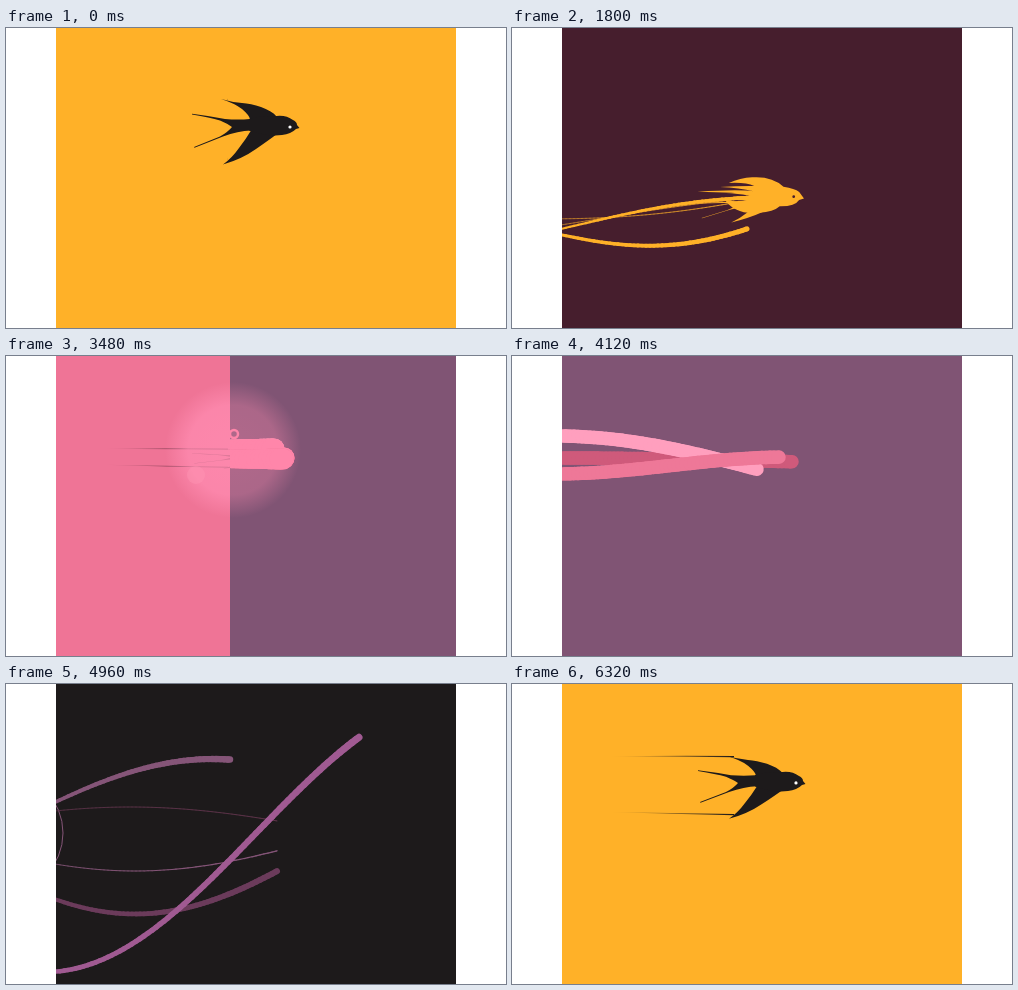
Recreate the animation shown at these times as an HTML page with a canvas. Size 500x300 px, loop 6360 ms.

```html
<!DOCTYPE html>
<html lang="en">
<head>
<meta charset="utf-8">
<title>Flying bird</title>
<style>
html, body { margin: 0; width: 100%; height: 100%; overflow: hidden; background: #fff; }
canvas { display: block; width: 500px; height: 300px; }
</style>
</head>
<body>
<canvas id="stage" width="500" height="300"></canvas>
<script>
const ctx = document.getElementById('stage').getContext('2d');
const LOOP = 6360, SPEED = 0.7714, LEFT = 50, RIGHT = 450;
const ORANGE = '#ffb128', PLUM = '#461e2d', PINK = '#ef7496', PURPLE = '#805474', INK = '#1d1a1b';

const clamp = (x, a = 0, b = 1) => Math.min(b, Math.max(a, x));
const mix = (a, b, u) => a + (b - a) * u;
const smooth = u => (1 - Math.cos(Math.PI * clamp(u))) / 2;
const easeOut = u => 1 - (1 - clamp(u)) ** 3;

function track(keys) {
  return t => {
    if (t <= keys[0][0]) return keys[0][1];
    for (let i = 1; i < keys.length; i++) {
      const [t0, a] = keys[i - 1], [t1, b] = keys[i];
      if (t <= t1) return mix(a, b, smooth((t - t0) / (t1 - t0)));
    }
    return keys[keys.length - 1][1];
  };
}

// Height of the flight line and opening of the wings
const flight = track([[0, 98], [500, 98], [1000, 196], [1400, 205], [2400, 112], [2800, 90],
  [3380, 101], [3480, 101], [4120, 105], [5600, 112], [6100, 97.5], [6360, 98]]);
const spread = track([[0, 1], [280, .35], [560, 1], [1000, 0], [1300, .8], [1650, .1], [1950, .8],
  [2400, 0], [2720, .9], [2980, .2], [3230, .9], [3480, 0], [5650, .2], [5900, 1], [6110, .4],
  [6320, .94], [6360, 1]]);
const pitch = t => Math.atan((flight(t + 20) - flight(t - 20)) / 40 / SPEED) * 0.6;

const WINGS = new Path2D('M271 89 C264 80 247 76 236 75 Q225 74 215 71 Q228 75 236 81 Q243 87 244 91 ' +
  'Q232 92 219 91 Q204 88 186 85.7 L186 86.5 Q204 89.5 214 92.5 Q222 96 226 99 Q222 104 214 108.5 ' +
  'L188 119 L188.5 119.8 L217 108.5 Q232 103 245 102.5 Q240 111 233 120 Q226 130 217 136.5 ' +
  'Q236 131 250 121 Q263 112 271 106 Z');
const BODY = new Path2D('M243 91 Q256 87 267 88.5 Q279 86 287 92 Q291 94 291 97 L293.5 100 L290 101 ' +
  'Q285 106 276 107 Q262 109 243 102.5 Z');
const FLAME = new Path2D('M292 198 L288 191 Q284 187 273 184 Q263 172 243 171 Q231 170 219 174 ' +
  'Q236 175 244 180 Q228 178 210 177 Q229 180 243 185 Q228 181 187 179 Q227 184 241 189 ' +
  'Q224 188 206 188.5 Q225 190 236 194 Q226 195 213 190 Q222 207 246 207 Q260 208 267 203 Q282 205 287 199 Z');
const PLUME = new Path2D('M290.5 112.5 L286.5 108 Q277 105 267.5 109.5 Q255 106 240 115 Q232 121 224 123 ' +
  'Q205 127 150 129 Q95 132 60 137 L60 138.5 Q105 134 150 132.5 Q195 130 217 131 L206 135 Q220 132 230 131 ' +
  'Q222 133 213 138 Q222 135 229 135 Q216 146 195 156 L196 157 Q215 148 225 143 L211 151 Q246 153 260 142 ' +
  'Q268 136 271 131 Q286 128 287 116 Z');
const CURLS = new Path2D('M105 119 Q142 108 154 112 Q168 118 190 127 Q205 130 225 130 ' +
  'M112 182 L165 181 Q176 181 182 175 Q203 153 222 149 M190 152 Q208 143 225 139 M62 135 Q140 134 222 131');

function disc(x, y, r, color) {
  ctx.fillStyle = color;
  ctx.beginPath();
  ctx.arc(x, y, Math.max(0, r), 0, 7);
  ctx.fill();
}

function ring(x, y, r, width, color) {
  ctx.strokeStyle = color;
  ctx.lineWidth = width;
  ctx.beginPath();
  ctx.arc(x, y, Math.max(0, r), 0, 7);
  ctx.stroke();
}

function square(x, y, size, angle, color, width) {
  ctx.save();
  ctx.translate(x, y);
  ctx.rotate(angle);
  ctx.fillStyle = ctx.strokeStyle = color;
  ctx.lineWidth = width || 1;
  ctx[width ? 'strokeRect' : 'fillRect'](-size / 2, -size / 2, size, size);
  ctx.restore();
}

// Horizontal gradient from clear to solid
function fadeIn(x0, x1, color) {
  const g = ctx.createLinearGradient(x0, 0, x1, 0);
  g.addColorStop(0, color + '00');
  g.addColorStop(1, color);
  return g;
}

function streak(x, y, length, rise, color) {
  ctx.fillStyle = fadeIn(x - length, x, color);
  ctx.beginPath();
  ctx.moveTo(x, y - .5);
  ctx.quadraticCurveTo(x - length / 2, y - 1.3, x - length, y - rise);
  ctx.quadraticCurveTo(x - length / 2, y - .4, x, y + .6);
  ctx.fill();
}

// A ribbon that thickens towards its round head
function ribbon(head, tail, yAt, w0, w1, color) {
  ctx.strokeStyle = color;
  ctx.lineCap = 'round';
  for (let x = tail; x < head; x += 4) {
    const end = Math.min(x + 4, head);
    ctx.lineWidth = mix(w0, w1, (end - tail) / (head - tail));
    ctx.beginPath();
    ctx.moveTo(x, yAt(x));
    ctx.lineTo(end, yAt(end));
    ctx.stroke();
  }
  ctx.lineCap = 'butt';
}

function fillWings(y, s) {
  ctx.save();
  ctx.translate(0, y);
  ctx.scale(1, s);
  ctx.translate(0, -98);
  ctx.fill(WINGS);
  ctx.restore();
}

function swallow(t, color, eye, trail) {
  const s = .3 + .7 * spread(t);
  ctx.save();
  ctx.translate(0, flight(t) - 98);
  if (trail > 0) {
    streak(222, 98 - 26.5 * s, 126 * trail, 0, color);
    streak(222, 98 + 34 * s, 126 * trail, 2.5, color);
  }
  ctx.fillStyle = color;
  fillWings(98, s);
  ctx.fill(BODY);
  disc(284, 99, 1.6, eye);
  ctx.restore();
}

// Places a drawing made for the pose at time ref into the pose at time t
function pose(t, ref, draw) {
  ctx.save();
  ctx.translate(255, flight(t));
  ctx.rotate(pitch(t) - pitch(ref));
  ctx.translate(-255, -flight(ref));
  draw();
  ctx.restore();
}

function openWings(t, ref, color) {
  const s = spread(t);
  if (s < .15) return;
  ctx.fillStyle = color;
  fillWings(flight(ref), s);
}

function orangeScene(t) {
  swallow(t, INK, '#fff', t > 5000 ? 1 : clamp(t / 160));
}

function plumScene(t, edge) {
  const age = t - 752;
  if (age > 0) {
    const k = easeOut(age / 248), x = edge;
    disc(x + 36, 170, 50 * k, 'rgba(255,177,40,.015)');
    for (const [dx, y, r] of [[3, 130, 19], [21, 144, 18], [14, 153, 17], [5, 160, 18]])
      disc(x + dx * k, mix(147, y, k), r * k, ORANGE);
    ring(x - 14 * k, 145, 62 * k, 2, ORANGE);
    ring(x + 12 * k, 147, 49 * k, 4, ORANGE);
    ring(x - 1, 147, 44 * k, 1, ORANGE);
  }
  const trail = (head, amp, shift, w0, w1) => ribbon(head, LEFT, x => {
    const tau = t - (290 - x) / SPEED;
    return flight(tau) + shift + amp * Math.sin(Math.max(0, tau - 752) * Math.PI / 360);
  }, w0, w1, ORANGE);
  trail(235, 24, 0, 3, 5);
  trail(250, -16, 0, 2, 4);
  trail(222, 4, -13, .5, .8);
  trail(228, -9, -5, .5, .8);
  pose(t, 1000, () => {
    openWings(t, 1000, ORANGE);
    ctx.fillStyle = ORANGE;
    ctx.fill(FLAME);
    disc(282, 195, 1.4, PLUM);
  });
}

function pinkScene(t, edge) {
  const age = t - 2078;
  if (age > 0 && age < 800) {
    const k = easeOut(age / 322), turn = (age - 322) / 500;
    const at = (x, y) => [edge + (x - 37) * k, mix(137, y, k)];
    const box = (x, y, size, angle, width) => square(...at(x, y), size * k, angle + turn, PLUM, width);
    box(43, 133, 34, .785);
    box(49, 161, 12, .785);
    box(66, 123, 7, .5);
    box(122, 156, 7, -.45);
    box(57.5, 109, 10, -.18, 1.1);
    box(70, 172, 10, .4, 1.1);
    box(50, 134, 49, .785, .5);
    box(42, 160, 46, .785, .5);
    disc(...at(69, 130.5), 2.5, PLUM);
    disc(...at(61, 188.5), 4.8, PLUM);
    ring(...at(110, 187), 2.5, .6, PLUM);
  }
  const turned = smooth((t - 2700) / 200);
  if (turned < 1) {
    ctx.globalAlpha = 1 - turned;
    pose(t, 2400, () => {
      openWings(t, 2400, PLUM);
      ctx.strokeStyle = fadeIn(95, 185, PLUM);
      ctx.lineWidth = .8;
      ctx.stroke(CURLS);
      ctx.fillStyle = PLUM;
      ctx.fill(PLUME);
      disc(281, 115, 1.4, ORANGE);
    });
  }
  if (turned > 0) {
    ctx.globalAlpha = turned;
    swallow(t, PLUM, ORANGE, turned);
  }
  ctx.globalAlpha = 1;
}

function glow(t, edge, strength) {
  const age = t - 3402;
  if (age < 0 || age > 420) return;
  const r = 68 * easeOut(age / 78), x = edge + 3, fade = 1 - smooth((age - 90) / 330);
  const g = ctx.createRadialGradient(x, 94, 0, x, 94, Math.max(1, r));
  g.addColorStop(0, 'rgba(255,139,176,1)');
  g.addColorStop(.66, 'rgba(255,139,176,.9)');
  g.addColorStop(1, 'rgba(255,139,176,0)');
  ctx.globalAlpha = strength * fade;
  disc(x, 94, r, g);
  disc(edge - 34, 119, 9, 'rgba(255,150,180,.5)');
  ctx.globalAlpha = 1;
}

function purpleScene(t, edge) {
  glow(t, edge, .38);
  const grown = smooth((t - 3480) / 400), flash = 1 - smooth((t - 3490) / 200);
  const shift = SPEED * (t - 4120);
  const strand = (h0, h1, dy, mid, amp, x0, half, color) => {
    const yAt = x => {
      const env = smooth((t - (290 - x) / SPEED - 3400) / 400);
      const wave = mid - amp * Math.cos(Math.PI * (x + shift - x0) / half);
      return mix(101 + dy, wave, env * grown);
    };
    const head = mix(h0, h1, grown), width = mix(21, 13.5, grown);
    const tailWidth = width * mix(.4, 1, grown);
    ribbon(head, LEFT, yAt, tailWidth, width, color);
    if (flash > 0) {
      ctx.globalAlpha = flash;
      ribbon(head, LEFT, yAt, tailWidth, width, '#ff86aa');
      ctx.globalAlpha = 1;
    }
  };
  strand(278, 280, 1, 105, 3, 50, 400, '#cf5a7b');
  strand(268, 245, -8, 113, 33, 45, 400, '#ff9fbe');
  strand(277, 267, 2, 109.5, -8.5, 40, 240, '#ee7898');
  const age = t - 3402;
  if (age > 0 && age < 400) ring(edge + 4, 78, 4 * easeOut(age / 78), 2.5, '#ff86aa');
}

function inkScene(t, edge) {
  const age = t - 4641, shift = SPEED * (t - 4960);
  if (age > 0) {
    const k = easeOut(age / 319);
    ring(edge - 41 * k, 149, 60 * k, 1, '#855578');
  }
  const strand = (head, mid, amp, x0, half, w0, w1, color) => ribbon(head, LEFT, x => {
    const calm = smooth((t - (290 - x) / SPEED - 5150) / 600);
    const wave = mid - amp * Math.cos(Math.PI * (x + shift - x0) / half);
    return mix(wave, 125 + (wave - 145) * .3, calm);
  }, w0, w1, color);
  strand(271, 145, 22, 125, 386, .8, 1, '#5c3349');
  strand(271, 153, -34, 130, 386, .8, 1.3, '#855578');
  strand(271, 158, -72, 130, 386, 4, 6, '#6b3b5b');
  strand(224, 135, 60, 208, 386, 3.5, 6.5, '#855578');
  strand(353, 150, -138, 40, 420, 4.5, 7, '#a05a92');
}

const scenes = [
  [5577 - LOOP, ORANGE, orangeScene],
  [539, PLUM, plumScene],
  [1864, PINK, pinkScene],
  [3188, PURPLE, purpleScene],
  [4427, INK, inkScene],
  [5577, ORANGE, orangeScene]
];
const edgeAt = (t, start) => Math.round(RIGHT - SPEED * (t - start));

function render(t) {
  ctx.fillStyle = '#fff';
  ctx.fillRect(0, 0, 500, 300);
  scenes.forEach(([start, color, draw], i) => {
    const next = scenes[i + 1];
    if (t < start || (next && edgeAt(t, next[0]) <= LEFT)) return;
    const edge = edgeAt(t, start), x = Math.max(LEFT, edge);
    ctx.save();
    ctx.beginPath();
    ctx.rect(LEFT, 0, RIGHT - LEFT, 300);
    ctx.clip();
    if (draw === purpleScene) glow(t, edge, .85);
    ctx.beginPath();
    ctx.rect(x, 0, RIGHT - x, 300);
    ctx.clip();
    ctx.fillStyle = color;
    ctx.fillRect(x, 0, RIGHT - x, 300);
    draw(t, edge);
    ctx.restore();
  });
}

const begin = performance.now();
function frame() {
  render((performance.now() - begin) % LOOP);
  requestAnimationFrame(frame);
}
frame();
</script>
</body>
</html>
```
